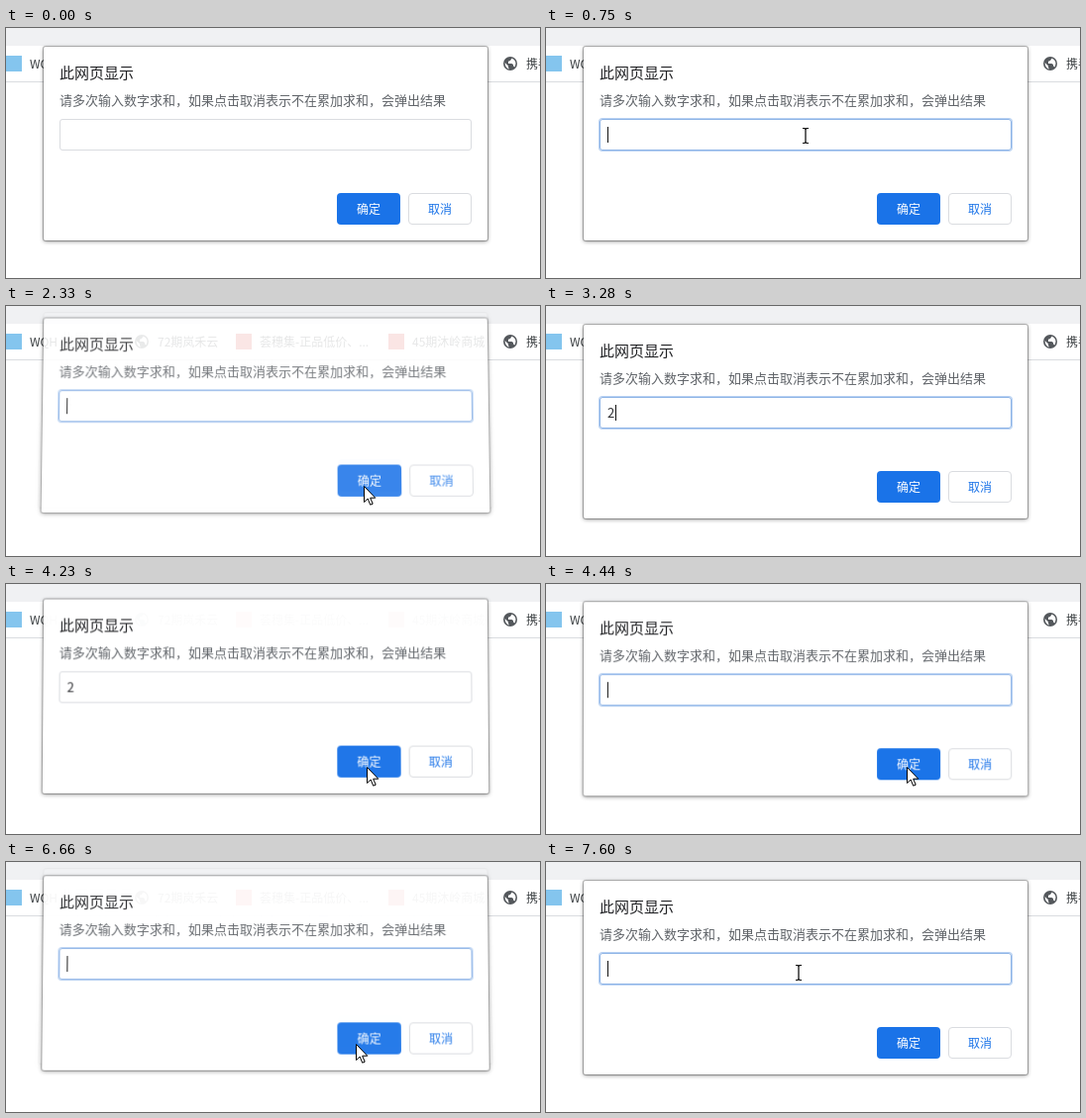
Write an HTML page that moves like this. It is 539x253 px and loops after 8 s.

```html
<!DOCTYPE html>
<html lang="zh-CN">
<head>
<meta charset="utf-8">
<title>数字求和</title>
<style>
  html, body { margin: 0; width: 100%; height: 100%; overflow: hidden; background: #fff; }
  body { font-family: "Noto Sans CJK SC", "Noto Sans CJK", "Noto Sans", sans-serif; }
  #stage { position: relative; width: 539px; height: 253px; overflow: hidden; }
  #stage * { position: absolute; box-sizing: border-box; white-space: nowrap; }

  .strip { left: 0; top: 0; width: 539px; height: 18px; background: #f0f1f3; }
  .rule { left: 0; top: 54px; width: 539px; height: 1px; background: #dadce0; }
  .mark { top: 26px; font-size: 12px; line-height: 20px; color: #3c4043; }
  .icon { top: 28px; width: 16px; height: 16px; }

  .dialog {
    left: 38px; top: 19px; width: 448px; height: 196px;
    background: #fff; border-radius: 2px;
    box-shadow: 0 0 0 1px rgba(0, 0, 0, .25), 0 1px 4px rgba(0, 0, 0, .45);
  }
  .title { left: 16px; top: 16px; font-size: 15px; line-height: 20px; color: #202124; }
  .message { left: 16px; top: 44px; font-size: 13px; line-height: 20px; color: #5f6368; }
  .field {
    left: 16px; top: 73px; width: 416px; height: 32px;
    border: 1px solid #dadce0; border-radius: 3px;
  }
  .focused .field { border-color: #8db3e6; box-shadow: 0 0 0 1px #b9d2f3; }
  .value { left: 7px; top: 0; font-size: 13px; line-height: 30px; color: #303135; }
  .caret { top: 7px; width: 1px; height: 16px; background: #111; }
  .button {
    top: 148px; width: 64px; height: 32px; border-radius: 4px;
    font-size: 12px; font-weight: 500; line-height: 32px; text-align: center;
  }
  .ok { left: 296px; background: #1a73e8; color: #fff; }
  .cancel { left: 368px; border: 1px solid #dadce0; line-height: 30px; color: #1a73e8; font-weight: 400; }

  #pointer { left: 0; top: 0; width: 1px; height: 1px; overflow: visible; }
</style>
</head>
<body>
<div id="stage">
  <div class="strip"></div>
  <div class="rule"></div>
  <i class="icon" style="left:0;background:#84c5ee"></i>
  <span class="mark" style="left:24px">WQH</span>
  <svg class="icon" style="left:129px" viewBox="0 0 16 16">
    <g id="globe">
      <circle cx="8" cy="8" r="7" fill="#54585c"/>
      <path d="M2.5 7L6 10.2V12L7 13.6Q3 12.800 2.500 7ZM6 5.800L8 5 9.500 2.700Q13.300 4 13.500 8L12.600 11.500 11 10.500V9L9.500 8H6Z" fill="#fff"/>
    </g>
  </svg>
  <span class="mark" style="left:153px">72期岚禾云</span>
  <i class="icon" style="left:232px;background:#d93a36"></i>
  <span class="mark" style="left:256px">荟穗集-正品低价、...</span>
  <i class="icon" style="left:386px;background:#d5302c"></i>
  <span class="mark" style="left:410px">45期沐岭商城</span>
  <svg class="icon" style="left:501px" viewBox="0 0 16 16"><use href="#globe"/></svg>
  <span class="mark" style="left:525px">携手出行</span>

  <template id="prompt">
    <div class="dialog">
      <div class="title">此网页显示</div>
      <div class="message">请多次输入数字求和，如果点击取消表示不在累加求和，会弹出结果</div>
      <div class="field"><span class="value"></span><i class="caret"></i></div>
      <div class="button ok">确定</div>
      <div class="button cancel">取消</div>
    </div>
  </template>

  <svg id="pointer">
    <path id="arrow" d="M.5 .5V16.500L4.200 13 6.700 19.200 9.200 18.200 6.700 12.200H11.800Z" fill="#fff" stroke="#000"/>
    <path id="beam" d="M-3 -7.500H-1L0 -6.500 1 -7.500H3M0 -6.500V6.500M-3 7.500H-1L0 6.500 1 7.500H3" fill="none" stroke="#000" stroke-width="1.200"/>
  </svg>
</div>
<script>
const LOOP = 8000, BLINK = 530, OPEN_MS = 220, CLOSE_MS = 215;
const $ = id => document.getElementById(id);
const clamp = v => Math.min(1, Math.max(0, v));

// Each prompt: when it opens, takes focus, receives its digit and closes (ms).
const rounds = [
  { open: -OPEN_MS, focus: 720, typed: 1060, digit: '1', close: 2120 },
  { open: 2270, focus: 2270, typed: 3090, digit: '2', close: 4118 },
  { open: 4275, focus: 4260, typed: 5390, digit: '3', close: 6450 },
  { open: 6576, focus: 6540, typed: Infinity, digit: '', close: Infinity }
];

// Pointer strokes: [time, x, y]; the pointer is hidden between strokes.
const strokes = [
  [[230, 304, 254], [500, 285, 170], [720, 262, 109], [880, 262, 109]],
  [[1420, 262, 109], [1680, 331, 164], [1940, 361, 182], [2480, 361, 182], [2840, 255, 95], [3280, 255, 95]],
  [[3530, 255, 95], [4020, 364, 185], [4480, 364, 185], [4920, 294, 111], [5010, 294, 111]],
  [[5640, 294, 111], [5820, 296, 115], [6180, 359, 187], [6290, 353, 184], [6760, 353, 184],
   [7240, 261, 115], [7360, 261, 115], [7480, 258, 108], [7600, 255, 112], [LOOP, 255, 112]]
];

for (const r of rounds) {
  r.el = $('prompt').content.firstElementChild.cloneNode(true);
  r.value = r.el.querySelector('.value');
  r.caret = r.el.querySelector('.caret');
  $('stage').insertBefore(r.el, $('pointer'));
}

function drawPrompt(r, t) {
  const shown = t >= r.open && t < r.close + CLOSE_MS;
  r.el.style.display = shown ? '' : 'none';
  if (!shown) return;

  // lift: 0 at rest, 1 fully tilted away
  const lift = t < r.close
    ? (1 - clamp((t - r.open) / OPEN_MS)) ** 2
    : clamp((t - r.close) / CLOSE_MS) ** 2;
  r.el.style.opacity = 1 - lift ** 3;
  r.el.style.transform = lift
    ? `translateY(${-13 * lift}px) perspective(900px) rotateX(${6 * lift}deg) scale(${1 + .009 * lift})`
    : 'none';

  const typed = t >= r.typed;
  const focused = t >= r.focus && t < r.close;
  const since = t - (typed ? r.typed : r.focus);
  r.value.textContent = typed ? r.digit : '';
  r.el.classList.toggle('focused', focused);
  r.caret.style.left = (typed ? 15 : 7) + 'px';
  r.caret.style.display = focused && Math.floor(since / BLINK) % 2 === 0 ? '' : 'none';
}

function pointerAt(t) {
  const s = strokes.find(p => t >= p[0][0] && t < p[p.length - 1][0]);
  if (!s) return null;
  const i = s.findIndex(p => p[0] > t);
  const [t0, x0, y0] = s[i - 1], [t1, x1, y1] = s[i];
  const u = (t - t0) / (t1 - t0);
  return [x0 + (x1 - x0) * u, y0 + (y1 - y0) * u].map(Math.round);
}

function drawPointer(t) {
  const p = pointerAt(t);
  $('pointer').style.display = p ? '' : 'none';
  if (!p) return;
  const [x, y] = p;
  const inField = x > 54 && x < 470 && y > 91 && y < 124;
  $('beam').style.display = inField ? '' : 'none';
  $('arrow').style.display = inField ? 'none' : '';
  $('pointer').style.transform = `translate(${x}px, ${y}px)`;
}

const start = performance.now();
function frame() {
  const t = (performance.now() - start) % LOOP;
  rounds.forEach(r => drawPrompt(r, t));
  drawPointer(t);
  requestAnimationFrame(frame);
}
frame();
</script>
</body>
</html>
```
